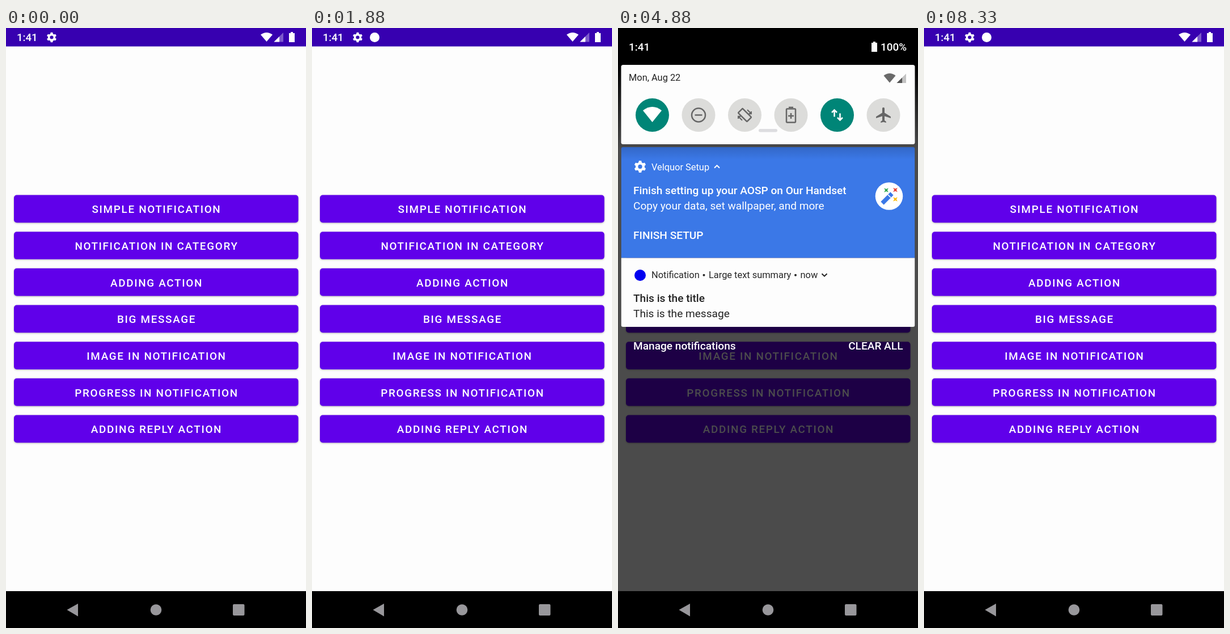
These frames come from a looping animation (529x1058 px, 8500 ms). An HTML page:

```html
<!DOCTYPE html>
<html lang="en">
<head>
<meta charset="utf-8">
<title>Notification shade</title>
<style>
  html, body { margin: 0; width: 100%; height: 100%; overflow: hidden; background: #fdfdfd; }
  svg { display: block; width: 100%; height: 100%; }
  text { font: 19.1px Roboto, sans-serif; white-space: pre; }
  .medium { font-weight: 500; }
  .small { font-size: 16.4px; }
  .button { font-size: 18.86px; font-weight: 500; letter-spacing: 1.684px; text-anchor: middle; }
  .raised { filter: drop-shadow(0 1.5px 1.5px rgba(0, 0, 0, .28)); }
  .line { fill: none; stroke-width: 2.5; }
</style>
</head>
<body>
<svg id="stage" viewBox="0 0 529 1058" preserveAspectRatio="none"></svg>
<script>
const LOOP = 8500;
const ICON_AT = 1700;
const EXPAND = { start: 5520, end: 5880 };
const COLLAPSED = 527, EXPANDED = 801;

// Height of the pulled-down shade: [ms, px]
const PULL = [[3420, 0], [3620, 260], [3830, 495], [4030, 640], [5400, 640],
  [5500, 900], [7300, 900], [7670, 719], [7790, 600], [8120, 0]];

const LABELS = ['SIMPLE NOTIFICATION', 'NOTIFICATION IN CATEGORY', 'ADDING ACTION', 'BIG MESSAGE',
  'IMAGE IN NOTIFICATION', 'PROGRESS IN NOTIFICATION', 'ADDING REPLY ACTION'];

const LOREM = [
  'Lorem ipsum dolor sit amet, consectetur adipiscing',
  'elit. Nunc sed leo consectetur, iaculis felis non, porta',
  'urna. Integer vulputate nisl at massa facilisis fringilla.',
  'Ut egestas, eros placerat placerat accumsan, orci velit',
  'finibus sem, in placerat lorem dolor in odio. Mauris auc-',
  'tor tortor eget quam facilisis commodo. Nulla in auctor',
  'justo, dapibus pharetra elit. Nam malesuada gravida',
  'porttitor. Integer placerat, est condimentum facilisis',
  'commodo, magna magna sodales dolor, non vestibulum',
  'turpis eget mauris. Sed aliquam lectus vel lacinia',
  'ultrices, quis tempor nunc pharetra et. Donec'];

const text = (x, y, content, cls = '', attrs = '') =>
  `<text x="${x}" y="${y}" class="${cls}" ${attrs}>${content}</text>`;
const at = (x, y, content, extra = '') => `<g transform="translate(${x} ${y}) ${extra}">${content}</g>`;

const gear = (x, y, size) => at(x, y,
  '<circle r="5.5" class="line" stroke="#fff" style="stroke-width:4"/>' +
  [0, 60, 120, 180, 240, 300].map(a =>
    `<path d="M-2.9-6L-2-9.9H2L2.9-6z" fill="#fff" transform="rotate(${a})"/>`).join(''),
  `scale(${size / 20})`);

const fan = (x, y, w, h, fill) =>
  `<path transform="translate(${x} ${y})" fill="${fill}"
    d="M${-w / 2} ${h * .24}Q0 ${-h * .24} ${w / 2} ${h * .24}L0 ${h}z"/>`;

const signal = (x, y, size, fill) =>
  `<g transform="translate(${x} ${y}) scale(${size})" fill="${fill}">
    <path d="M1 0V1H0z" opacity=".35"/><path d="M.58 .42V1H0z"/></g>`;

const battery = (x, y) =>
  `<path transform="translate(${x} ${y})" fill="#fff" d="M3 0h4v2h3v16h-10V2h3z"/>`;

const chevron = (x, y, color, flip = 1) =>
  at(x, y, `<path d="M-4.5 2.3L0-2.2L4.5 2.3" class="line" stroke="${color}" style="stroke-width:2"/>`, `scale(1 ${flip})`);

const spark = (x, y, fill) =>
  at(x, y, `<path d="M0-6L1.5-1.5L6 0L1.5 1.5L0 6L-1.5 1.5L-6 0L-1.5-1.5z" fill="${fill}"/>`, 'rotate(45) scale(.9)');

const tileIcons = [
  fan(0, -14.5, 33, 27, '#fff'),
  '<g class="line" stroke="#666"><circle r="12"/><path d="M-6.5 0H6.5"/></g>',
  `<g class="line" stroke="#666" transform="rotate(45)"><rect x="-11" y="-5.5" width="22" height="11" rx="1"/>
    <path d="M-4-11.5H7.5M4-15L7.5-11.5L4-8M4 11.5H-7.5M-4 15L-7.5 11.5L-4 8" transform="scale(.85)"/></g>`,
  `<g class="line" stroke="#666"><rect x="-8" y="-11" width="16" height="24" rx="1.5"/>
    <path d="M-4-13.5H4M-5 1.5H5M0-3.5V6.5"/></g>`,
  `<g class="line" stroke="#fff"><path d="M-5 3V-8M-9.5-4.5L-5-9L-.5-4.5M5-3V8M.5 4.5L5 9L9.5 4.5"/></g>`,
  `<path transform="scale(1.36) translate(-11.5 -12)" fill="#666"
    d="M21 16v-2l-8-5V3.5a1.5 1.5 0 0 0-3 0V9l-8 5v2l8-2.5V19l-2 1.5V22l3.5-1 3.5 1v-1.5L13 19v-5.5z"/>`];

const tiles = tileIcons.map((icon, i) => at(60.5 + 81.5 * i, 153.5,
  `<circle r="29.5" fill="${i === 0 || i === 4 ? '#008577' : '#dcdcda'}"/>${icon}`)).join('');

const buttons = LABELS.map((label, i) => at(14, 294.5 + 64.67 * i,
  `<rect width="501.5" height="48.7" rx="5" fill="#6000ea" class="raised"/>` +
  text(251.5, 31.8, label, 'button', 'fill="#fff"'))).join('');

const statusBar = `
  <rect width="529" height="32.5" fill="#3700b0"/>
  <g id="status" fill="#fff">${text(19, 23.3, '1:41', 'medium', 'style="font-size:18.6px"')}${gear(80.5, 16.5, 17.5)}
    <circle id="badge" cx="110.5" cy="16.5" r="8.5"/>
    ${fan(459.5, 8, 21, 16, '#fff')}${signal(472.5, 8, 16.5, '#fff')}${battery(499, 7)}</g>`;

const quickSettings = `
  <rect y="65" width="529" height="150" fill="url(#fade)"/>
  <rect y="-300" width="529" height="365" fill="#000"/>
  <g fill="#fff">${text(19, 40, '1:41', 'medium', 'style="font-size:18.86px"')}
    ${battery(447, 24)}${text(463, 40, '100%', 'medium', 'style="font-size:18.86px"')}</g>
  <rect x="5.5" y="65" width="518" height="140" rx="3.5" fill="#fdfdfd"/>
  ${text(19, 93, 'Mon, Aug 22', 'small', 'fill="#222"')}
  ${fan(479, 80, 21, 16.5, '#6a6a6a')}${signal(491.5, 80.5, 16.5, '#555')}
  ${tiles}
  <rect x="248" y="178" width="33" height="5.5" rx="2.7" fill="#dddde0"/>`;

const setupCard = `
  <rect x="5.5" y="210" width="518" height="195.5" fill="#3b78e7"/>
  <rect x="5.5" y="210" width="518" height="22" fill="url(#shade)"/>
  ${gear(39, 244.5, 21)}
  <g fill="#fff">${text(59, 250.5, 'Velquor Setup', 'small')}${chevron(174.5, 244.5, '#fff')}
    ${text(27, 293, 'Finish setting up your AOSP on Our Handset', 'medium')}
    ${text(27, 319.5, 'Copy your data, set wallpaper, and more')}
    ${text(27, 372.3, 'FINISH SETUP', 'medium')}
    <circle cx="478" cy="296.5" r="24.3"/></g>
  <path d="M466 309L483 292" stroke="#3b78e7" stroke-width="7.5"/>
  <path d="M476 294L481 299" stroke="#fff" stroke-width="1.6"/>
  ${spark(473, 286, '#34a853')}${spark(489, 285.5, '#ea4335')}${spark(489, 302, '#fbbc05')}`;

const messageCard = `
  <rect x="5.5" y="405.5" width="518" height="600" fill="#fdfdfd"/>
  <g id="cardHead" fill="#262626"><circle cx="39" cy="436" r="10" fill="#0000f0"/>
    ${text(59, 441.2, 'Notification', 'small')}<circle cx="151.5" cy="435.7" r="2"/>
    ${text(160, 441.2, 'Large text summary', 'small')}<circle cx="313" cy="435.7" r="2"/>
    ${text(321.5, 441.2, 'now', 'small')}
    <g id="chevronDown">${chevron(364, 435.5, '#222', -1)}</g>
    <g id="chevronUp">${chevron(364, 435.5, '#222')}</g></g>
  <g id="brief" fill="#222">${text(27, 483.4, 'This is the title', 'medium')}
    ${text(27, 510, 'This is the message')}</g>
  <g id="full" fill="#222">${text(27, 488.4, 'Large text title', 'medium')}
    ${LOREM.map((line, i) => text(27, 515 + 26.88 * i, line)).join('')}</g>`;

const nav = `
  <rect y="993" width="529" height="65" fill="#000"/>
  <g fill="#98979b"><path d="M107.5 1026L127 1015V1037.5z"/><circle cx="264.5" cy="1026" r="9.8"/>
    <rect x="400" y="1016" width="20.5" height="20" rx="2"/></g>`;

document.getElementById('stage').innerHTML = `
  <defs>
    <linearGradient id="fade" x2="0" y2="1"><stop stop-color="#000"/><stop offset="1" stop-color="#000" stop-opacity="0"/></linearGradient>
    <linearGradient id="shade" x2="0" y2="1"><stop stop-color="#000" stop-opacity=".14"/><stop offset="1" stop-color="#000" stop-opacity="0"/></linearGradient>
    <clipPath id="shadeClip"><rect id="shadeEdge" width="529"/></clipPath>
    <clipPath id="cardClip"><rect id="cardEdge" x="5.5" y="210" width="518" rx="3.5"/></clipPath>
  </defs>
  <rect width="529" height="1058" fill="#fdfdfd"/>
  ${buttons}${statusBar}
  <rect id="scrim" width="529" height="1058"/>
  <g id="shadeLayer" clip-path="url(#shadeClip)"><g id="sheet">
    <g clip-path="url(#cardClip)">${setupCard}${messageCard}</g>
    <g id="footer" fill="#fff">${text(27, 40, 'Manage notifications', 'medium')}
      ${text(502.5, 40, 'CLEAR ALL', 'medium', 'text-anchor="end"')}</g>
    ${quickSettings}
  </g></g>
  ${nav}`;

const el = Object.fromEntries([...document.querySelectorAll('[id]')].map(node => [node.id, node]));
const set = (name, attr, value) => el[name].setAttribute(attr, value);
const clamp = v => Math.min(1, Math.max(0, v));

function track(points, t) {
  if (t <= points[0][0]) return points[0][1];
  for (let i = 1; i < points.length; i++) {
    const [t0, a] = points[i - 1], [t1, b] = points[i];
    if (t < t1) return a + (b - a) * (t - t0) / (t1 - t0);
  }
  return points.at(-1)[1];
}

// cubic-bezier(.4, 0, .2, 1), solved by bisection
function fastOutSlowIn(x) {
  let lo = 0, hi = 1;
  for (let i = 0; i < 20; i++) {
    const s = (lo + hi) / 2, r = 1 - s;
    if (1.2 * s * r * r + .6 * s * s * r + s ** 3 < x) lo = s; else hi = s;
  }
  return 3 * lo * lo * (1 - lo) + lo ** 3;
}

function draw(t) {
  const height = track(PULL, t);
  const grow = fastOutSlowIn(clamp((t - EXPAND.start) / (EXPAND.end - EXPAND.start)));
  const open = t >= EXPAND.start;
  const bottom = COLLAPSED + (EXPANDED - COLLAPSED) * grow;
  const slide = Math.min(0, (height - 330) * .65);
  const headShift = open ? 4.7 : 0;

  set('badge', 'opacity', t >= ICON_AT ? 1 : 0);
  set('status', 'opacity', 1 - clamp(height / 150));
  set('scrim', 'opacity', .7 * clamp(height / 300));
  set('shadeLayer', 'visibility', height > 0 ? 'visible' : 'hidden');
  set('shadeEdge', 'height', height >= 330 ? 1058 : height);
  set('sheet', 'transform', `translate(0 ${slide})`);
  set('cardEdge', 'height', Math.max(0, Math.min(bottom, height - slide) - 210));
  set('cardHead', 'transform', `translate(0 ${headShift})`);
  set('brief', 'transform', `translate(0 ${headShift})`);
  set('brief', 'opacity', 1 - grow);
  set('full', 'opacity', grow);
  set('chevronDown', 'opacity', open ? 0 : 1);
  set('chevronUp', 'opacity', open ? 1 : 0);
  set('footer', 'transform', `translate(0 ${bottom})`);
  set('footer', 'opacity', clamp((height - bottom - 20) / 40));
}

const start = performance.now();
function tick() {
  draw((performance.now() - start) % LOOP);
  requestAnimationFrame(tick);
}
tick();
</script>
</body>
</html>
```
